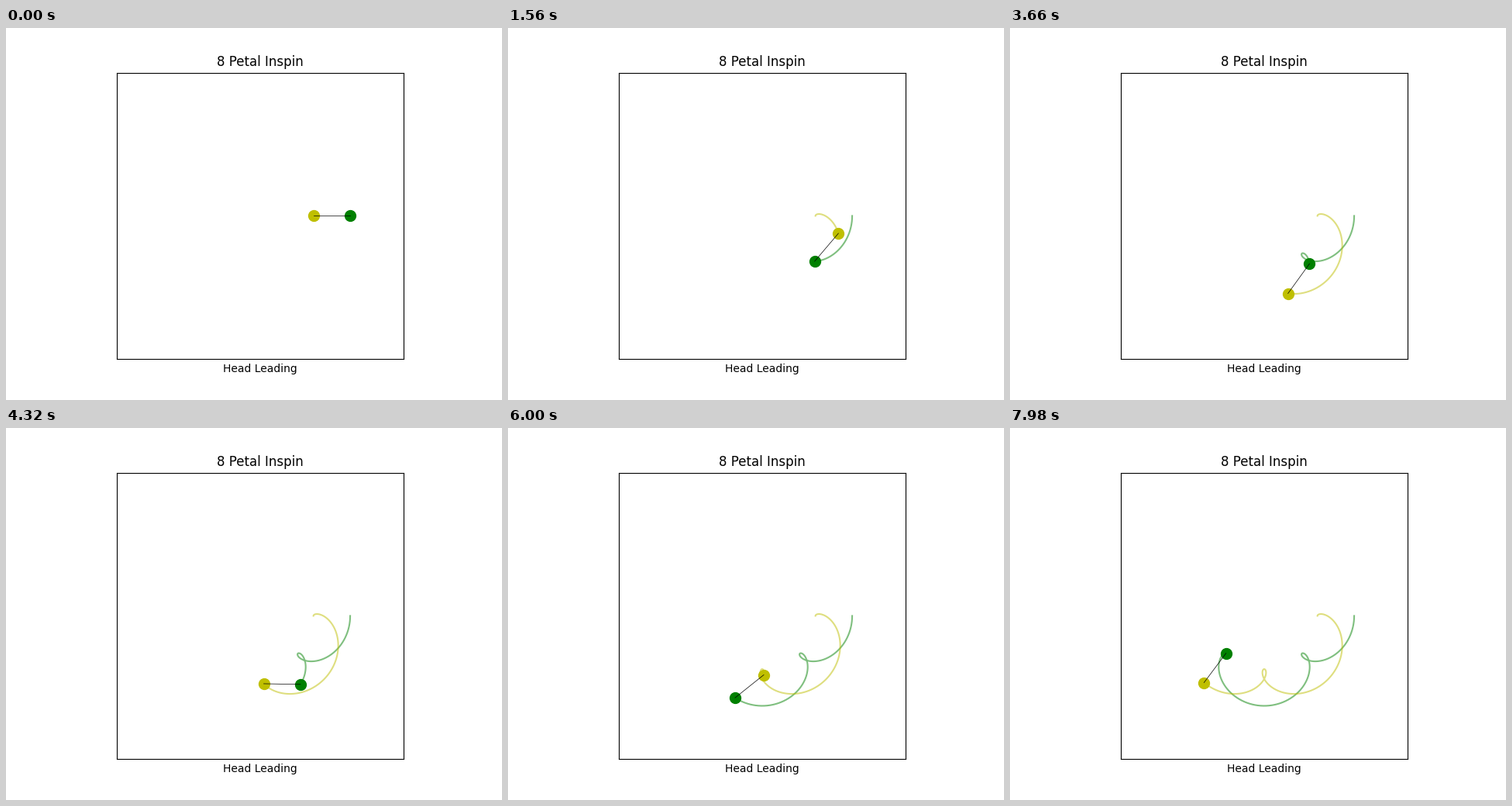
Recreate the animation shown at these times as a matplotlib script. Size 640x480 px, loop 8 s.

```python
import numpy as np
import matplotlib.pyplot as plt
from matplotlib.animation import FuncAnimation

ARM = 1.0      # radius of the hand circle
HALF = 0.2565  # half the length of the stick
SPIN = 5       # stick turns per hand turn
TICK = 20      # ms
HOLD = 3       # ticks per step

# Clockwise path of the hand, with the head and tail on either side of it
angle = -np.linspace(0, 2 * np.pi, 360)
hand = ARM * np.exp(1j * angle)
stick = HALF * np.exp(1j * SPIN * angle)
head, tail = hand + stick, hand - stick

fig, ax = plt.subplots(figsize=(6.4, 4.8), dpi=100)
ax.set_aspect("equal")
ax.set_xlim(-2, 2)
ax.set_ylim(-2, 2)
ax.set_xticks([])
ax.set_yticks([])
ax.set_title("8 Petal Inspin")
ax.set_xlabel("Head Leading")

head_trail, = ax.plot([], [], "g", alpha=0.5)
tail_trail, = ax.plot([], [], "y", alpha=0.5)
head_dot, = ax.plot([], [], "go", ms=10)
tail_dot, = ax.plot([], [], "yo", ms=10)
rod, = ax.plot([], [], "k", lw=0.5)


def place(line, points):
    line.set_data(points.real, points.imag)


def update(tick):
    k = tick // HOLD
    place(head_trail, head[:k + 1])
    place(tail_trail, tail[:k + 1])
    place(head_dot, head[k:k + 1])
    place(tail_dot, tail[k:k + 1])
    place(rod, np.array([tail[k], head[k]]))
    return head_trail, tail_trail, head_dot, tail_dot, rod


anim = FuncAnimation(fig, update, frames=8000 // TICK, interval=TICK,
                     repeat=True, repeat_delay=0)
plt.show()
```
